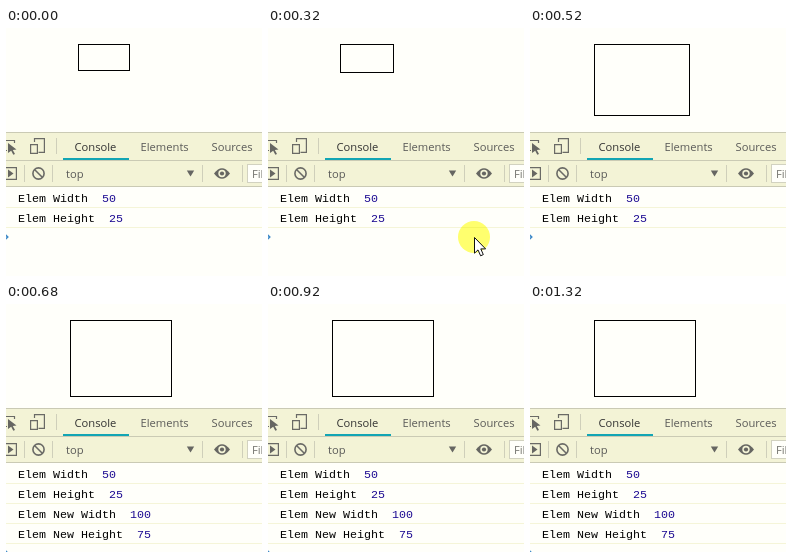
Animation of 256 by 248 pixels, one loop 1360 ms. Source, as an HTML page:

```html
<!DOCTYPE html>
<html lang="en">
<head>
<meta charset="utf-8">
<title>Element resize</title>
<style>
  html, body { margin: 0; width: 100%; height: 100%; overflow: hidden; background: #fffffa; }
  svg { display: block; width: 100%; height: 100%; }
  text { white-space: pre; }
  .ui { font: 11.2px "Open Sans", "Noto Sans", sans-serif; fill: #5a5a58; }
  .log { font: 11.665px "Liberation Mono", "DejaVu Sans Mono", monospace; fill: #000; }
  .num { fill: #1c0a92; }
  .icon { fill: none; stroke: #6a6a66; stroke-width: 1.2; }
  .solid { fill: #666662; }
</style>
</head>
<body>
<svg viewBox="0 0 256 248" preserveAspectRatio="none">
  <rect width="256" height="248" fill="#fffffa"/>
  <rect id="box" y="16.5" fill="#fffffa" stroke="#000"/>

  <rect y="104" width="256" height="55" fill="#f3f3d6"/>
  <path d="M0 104.5H256M0 132.5H256M0 158.5H256" stroke="#cacab4"/>
  <path d="M50.5 110V126M18.5 137V154M46.5 137V154M196.5 137V154M236.5 137V154" stroke="#cfcfba"/>
  <rect x="57" y="130" width="66" height="2" fill="#12a5b4"/>

  <g class="ui">
    <text x="68.5" y="123" fill="#333" style="fill:#333">Console</text>
    <text x="134.5" y="123">Elements</text>
    <text x="205.5" y="123">Sources</text>
    <text x="60" y="150">top</text>
  </g>
  <path class="solid" d="M180.8 142.5H188.2L184.5 148.5Z"/>
  <rect x="241.5" y="136.5" width="30" height="18" fill="#fffffa" stroke="#d2d2c0"/>
  <text class="ui" x="246" y="150" style="fill:#757570">Filter</text>

  <g class="icon">
    <path d="M-2 112.5H8.5V115M-2 122.5H1"/>
    <path d="M28.5 114V110.6H38.4V124.4H32.5M24.6 116.6H31.4V125.4H24.6Z"/>
    <path d="M-2 139.6H10.4V151.4H-2"/>
    <circle cx="32.5" cy="145.5" r="5.6" stroke-width="1.6"/>
    <path d="M28.5 141.5L36.5 149.5" stroke-width="1.6"/>
  </g>
  <path class="solid" d="M2 115L10.5 121.5L6.8 122L9 126L7.3 126.8L5.2 122.8L2 125Z"/>
  <path class="solid" d="M2 141.5L7.5 145.5L2 149.5Z"/>
  <path class="solid" d="M208 145.5Q216 135 224 145.5Q216 156 208 145.5Z"/>
  <circle cx="216" cy="145.5" r="3.7" fill="#f3f3d6"/>
  <circle class="solid" cx="216" cy="145.5" r="2.1"/>

  <g id="logs"></g>
  <path id="prompt" d="M-2 205.5L1.7 209L-2 212.5" fill="none" stroke="#3c88c8" stroke-width="1.6"/>

  <g id="mouse">
    <circle r="16" fill="#ffff70" style="mix-blend-mode:multiply"/>
    <path d="M.5 .5V16.2L4 12.9L6.6 18.8L9.3 17.6L6.8 11.9H11.6Z" fill="#fff" stroke="#111"/>
  </g>
</svg>
<script>
const LOOP = 1360, STEP = 40;
const GROW_START = 278, GROW_END = 560, GROW_TIME = 308, LOG_AT = 640;
const $ = id => document.getElementById(id);

const lines = [["Elem Width", 50], ["Elem Height", 25], ["Elem New Width", 100], ["Elem New Height", 75]];
$("logs").innerHTML = lines.map(([label, value], i) => `<g>
  <text class="log" x="12" y="${174 + i * 20}">${label}  <tspan class="num">${value}</tspan></text>
  <path d="M0 ${179.5 + i * 20}H256" stroke="#f5f5d8"/></g>`).join("");
const rows = [...$("logs").children];

function swing(t) {
  if (t < GROW_START) return 0;
  if (t >= GROW_END) return 1;
  return 0.5 - Math.cos(Math.PI * (t - GROW_START) / GROW_TIME) / 2;
}

function draw(t) {
  const grow = 50 * swing(t);
  const box = $("box");
  // The page scrollbar pushes the box left once it gets tall.
  const edge = grow > 30 ? 63.5 : 72;
  const left = Math.round(edge), right = Math.round(edge + 52 + grow);
  box.setAttribute("x", left + 0.5);
  box.setAttribute("width", right - left - 1);
  box.setAttribute("height", Math.round(26 + grow));

  const logged = t >= LOG_AT;
  rows.forEach((row, i) => row.setAttribute("visibility", i < 2 || logged ? "visible" : "hidden"));
  $("prompt").setAttribute("transform", `translate(0 ${logged ? 40 : 0})`);

  const u = t - 200;
  const x = 238 - 0.27 * u, y = 181.5 + 0.2125 * u + 0.00015 * u * u;
  $("mouse").setAttribute("transform", `translate(${Math.round(x)} ${Math.round(y)})`);
  $("mouse").setAttribute("visibility", t < 520 ? "visible" : "hidden");
}

const start = performance.now();
function tick() {
  const t = (performance.now() - start) % LOOP;
  draw(Math.floor(t / STEP) * STEP);
  requestAnimationFrame(tick);
}
tick();
</script>
</body>
</html>
```
